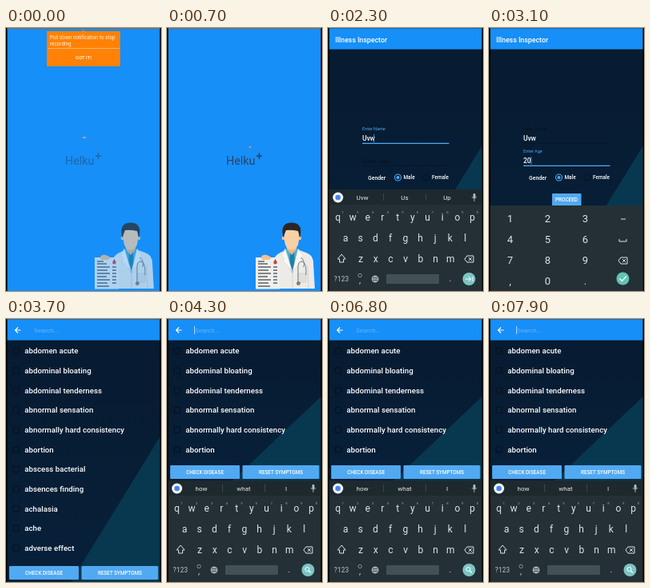
These frames come from a looping animation (194x329 px, 8000 ms). An HTML page:

```html
<!DOCTYPE html>
<html lang="en">
<head>
<meta charset="utf-8">
<title>Symptom checker demo</title>
<style>
  html, body { margin: 0; width: 100%; height: 100%; overflow: hidden; background: #000; }
  svg { display: block; width: 100vw; height: 100vh; font-family: Roboto, "Noto Sans", sans-serif; }
</style>
</head>
<body>
<svg id="stage" viewBox="0 0 194 329" preserveAspectRatio="none">
  <defs>
    <linearGradient id="navy" x1="0" y1="0" x2="0" y2="1">
      <stop offset="0" stop-color="#071b31"/>
      <stop offset="1" stop-color="#072039"/>
    </linearGradient>
    <clipPath id="screen"><path d="M1.600 0H192.500V329H1.600Z"/></clipPath>
    <g id="doctor">
      <path d="M130 326L133 291Q135 284 142 281L150 277H163L174 281Q181 283 183 291L185 326Z" fill="#ecebe7"/>
      <path d="M148 277H164L157 307Z" fill="#46b0da"/>
      <path d="M154 281H159L160 300L157 306L153 300Z" fill="#1f7fa6"/>
      <path d="M150 268H162V277L156 284L150 277Z" fill="#e8b588"/>
      <path d="M148 276L157 305L145 291L147 288L143 285Z M164 276L157 305L169 291L166 288L170 285Z" fill="#f8f8f6" stroke="#cfd0ce" stroke-width=".5"/>
      <path d="M157 305V326M176 296L177 326" stroke="#c8c9c7" stroke-width=".7"/>
      <circle cx="146" cy="263" r="2.300" fill="#f1c295"/>
      <circle cx="166" cy="263" r="2.300" fill="#f1c295"/>
      <path d="M147 252H165V266Q164 277 156 278Q148 277 147 266Z" fill="#f9d0a4"/>
      <path d="M145.500 262Q142 248 150 244.500Q163 241 167 250Q168 256 166.500 262L164 254Q156 252 149 253Z" fill="#2b2624"/>
      <path d="M164 307H174V318H164Z" fill="#e0e0dd" stroke="#bdbfbf" stroke-width=".5"/>
      <path d="M168 287Q173 292 171 299M164 309V300Q164 292 168 292Q174 292 174 304V309M164 309V319" fill="none" stroke="#777d82" stroke-width="1"/>
      <circle cx="164.500" cy="319.500" r="2" fill="#b9666a" stroke="#777d82"/>
      <path d="M111 287H141V326.500H111Z" fill="#efefed"/>
      <path d="M118 287Q119 283 125 284L131 287L128 290H119Z" fill="#f2c093"/>
      <path d="M135.500 289Q140 295 135.500 295.500Q131 295 135.500 289Z" fill="#c8473f"/>
      <path d="M114 292H122M114 295H126M114 299H130M114 303H127M114 307H130M114 311H126M114 315H130M114 319H127M114 323H129M133 299H138M133 303H138M133 307H138M133 311H138M133 315H138M133 319H138" stroke="#5d6366" stroke-width="1.300"/>
    </g>
  </defs>
  <g id="view" clip-path="url(#screen)"></g>
</svg>
<script>
const LOOP = 8000, STEP = 100;
const BLUE = '#168ff9', SKY = '#51a9f2', HINT = '#061221', KEY = '#dfe3e4', GREY = '#9ca5a9';
const view = document.getElementById('view');

const clamp = v => Math.max(0, Math.min(1, v));
const ramp = (t, from, to) => clamp((t - from) / (to - from));
const ease = p => 1 - (1 - p) ** 2;
const rect = (x, y, w, h, fill, more = '') =>
  `<rect x="${x}" y="${y}" width="${w}" height="${h}" fill="${fill}" ${more}/>`;
const dot = (x, y, r, fill, more = '') => `<circle cx="${x}" cy="${y}" r="${r}" fill="${fill}" ${more}/>`;
const line = (d, color, width = 1) => `<path d="${d}" fill="none" stroke="${color}" stroke-width="${width}"/>`;
const text = (x, y, str, size, fill = '#fff', more = '') =>
  `<text x="${x}" y="${y}" font-size="${size}" fill="${fill}" ${more}>${str}</text>`;
const MID = 'text-anchor="middle"', BOLD = 'font-weight="500"';
const label = (x, y, str, size, fill, more = '') => text(x, y, str, size, fill, MID + ' ' + more);
const at = (x, y, body) => `<g transform="translate(${x} ${y})">${body}</g>`;

// Latest value whose start time has passed
const pick = (t, steps) => steps.reduce((now, [start, value]) => t >= start ? value : now, steps[0][1]);

function backdrop(bottom) {
  const h = bottom - 27;
  return rect(0, 26, 194, h + 1, 'url(#navy)') +
    `<path d="M193 ${27 + h * 0.397}L81 ${bottom}H193Z" fill="#073850"/>`;
}

const header = () => rect(0, 0, 194, 26.6, BLUE) + rect(0, 0, 194, 0.6, '#385064');

function splash(t) {
  const fade = ramp(t, 0, 500), drift = ramp(t, 0, 700);
  let out = rect(0, 0, 194, 329, BLUE) + rect(0, 0, 194, 1.4, '#6b7075');
  out += `<g opacity="${0.52 + 0.48 * fade}">` +
    text(74, 171, 'Helku', 14.3, '#2a435f') + text(111.5, 164.5, '+', 14.3, '#2a435f', BOLD) + '</g>';
  out += `<ellipse cx="${98 + 6 * drift}" cy="${137 + 12 * drift}" rx="${2.6 - drift}" ry="1" fill="#c3c3d2" stroke="#6d7796" stroke-width=".6"/>`;
  out += `<use href="#doctor" opacity="${0.7 + 0.3 * fade}"/>`;
  if (t < 400) out += rect(51, 4, 92, 44, '#ff8206') + '<path d="M95 4L97 2L99 4Z" fill="#ff8206"/>' +
    text(55, 14, 'Pull down notification to stop', 6.3, '#fff3df') + text(55, 21.5, 'recording', 6.3, '#fff3df') +
    line('M52 25.500H142', '#ffc17f', 0.8) + label(97, 39, 'GOT IT!', 6, '#fff', BOLD);
  return out;
}

const backspace = (x, y) => at(x, y,
  line('M-6 0L-3 -4H5V4H-3ZM-1 -2L3 2M3 -2L-1 2', KEY));

function letterPad(caps, words, action) {
  const cased = s => caps ? s.toUpperCase() : s;
  let out = rect(0, 202, 194, 127, '#243035') + rect(0, 202, 194, 19, '#1e292e');
  out += dot(12.5, 212, 6.5, '#f6f7f7') + dot(12.5, 212, 3.3, '#4285f4');
  out += line('M69.500 207V216M122.500 207V216', '#4a555a', 0.7);
  words.forEach((w, i) => out += label(43 + 53 * i, 215, w, 8, '#e8ebec'));
  out += rect(181.7, 207, 2.8, 6, '#b9c1c4', 'rx="1.400"') + line('M180 211Q183 216 186 211M183 214V217', '#b9c1c4', 0.8);
  [['qwertyuiop', 12.3, 240.5], ['asdfghjkl', 22, 266.5], ['zxcvbnm', 41, 293]].forEach(([row, x0, y], r) => {
    [...row].forEach((c, i) => {
      const x = x0 + 18.7 * i;
      out += label(x, y, cased(c), 12, KEY);
      if (!r) out += label(x + 6.3, 231.5, (i + 1) % 10, 4.4, GREY);
    });
  });
  out += `<path d="M17 283L22 289H19.500V293H14.500V289H12Z" fill="${caps ? GREY : 'none'}" stroke="${caps ? GREY : KEY}"/>`;
  out += backspace(177, 289) + label(16.8, 317, '?123', 8.4, GREY, BOLD);
  out += dot(40, 309.5, 2.2, 'none', `stroke="${GREY}" stroke-width=".8"`) + label(40, 319, ',', 10, KEY);
  out += dot(59, 314, 4, 'none', `stroke="${KEY}" stroke-width=".8"`) +
    line('M55 314H63M59 310V318M59 310Q54.500 314 59 318Q63.500 314 59 310', KEY, 0.7);
  out += rect(73, 308, 66, 12, '#435055', 'rx="1"') + label(153, 317, '.', 11, KEY);
  out += dot(176.5, 314, 8, '#7bc4c4');
  out += action === 'search'
    ? dot(175.5, 313, 2.6, 'none', 'stroke="#fff"') + line('M177.500 315L180 317.500', '#fff', 1.2)
    : line('M172 314H179M176 311L179 314L176 317M181 311V317', '#fff');
  return out;
}

function numberPad() {
  let out = rect(0, 222, 194, 107, '#243035');
  ['123', '456', '789', ',0.'].forEach((row, r) => [...row].forEach((c, i) =>
    out += label(26.5 + 47 * i, 243 + 26 * r, c, 13, KEY)));
  out += line('M165 239H171M163 264V267H172V264', KEY) + backspace(168, 291);
  return out + dot(167.5, 313.5, 8, '#62c3b4') + line('M163.500 313.500L166.500 316.500L172 310.500', '#fff', 1.3);
}

const radio = (x, on) => dot(x, 187, 4, 'none', `stroke="${on ? SKY : HINT}" stroke-width="1.100"`) +
  (on ? dot(x, 187, 2.1, SKY) : '');

function field(name, y, value, focused, caret) {
  const floated = focused || value;
  let out = floated
    ? text(43, y - 10, name, 5.5, focused ? SKY : HINT)
    : text(43, y + 3, name, 8, HINT);
  out += text(43, y + 3, value, 8.4, '#fff', BOLD);
  out += line(`M43 ${y + 6.3}H151.500`, focused ? SKY : HINT, focused ? 1.2 : 0.6);
  if (focused && caret) out += rect(43.5 + value.length * 4.5, y - 5, 0.8, 10, SKY);
  return out;
}

function form(t) {
  const focus = pick(t, [[0, ''], [1200, 'name'], [2400, 'age']]);
  const name = pick(t, [[0, ''], [1700, 'U'], [1900, 'Uv'], [2100, 'Uvw']]);
  const age = pick(t, [[0, ''], [2700, '2'], [2900, '20']]);
  const caret = Math.floor(t / 500) % 2 === 0;
  let out = backdrop(329) + header() + text(9, 18, 'Illness Inspector', 8.8, '#fff', BOLD);
  out += field('Enter Name', 138, name, focus === 'name', caret);
  out += field('Enter Age', 166, age, focus === 'age', caret);
  out += text(50, 189.5, 'Gender', 6.9, '#fff', BOLD) + radio(87.5, true) + text(94.5, 189.4, 'Male', 6.4, '#fff', BOLD) +
    radio(123, false) + text(130, 189.4, 'Female', 6.4, '#fff', BOLD);
  out += rect(79, 207, 36.5, 16, SKY, 'rx="1"') + label(97, 217.4, 'PROCEED', 6.4, '#fff', BOLD);
  const shown = ease(ramp(t, 1100, 1400)) - ramp(t, 3200, 3400);
  if (shown > 0) out += at(0, 127 * (1 - shown), focus === 'age'
    ? numberPad()
    : letterPad(!name, name ? [name, 'Us', 'Up'] : ['How', 'What', 'I'], 'next'));
  return out;
}

const ALL = ['abdomen acute', 'abdominal bloating', 'abdominal tenderness', 'abnormal sensation',
  'abnormally hard consistency', 'abortion', 'abscess bacterial', 'absences finding',
  'achalasia', 'ache', 'adverse effect'];
const FOUND = ['pain', 'pain abdominal', 'pain back', 'pain chest', 'pain foot', 'pain in lower limb'];

function search(t) {
  const query = pick(t, [[0, ''], [4700, 'p'], [4900, 'pa'], [5200, 'pai'], [5400, 'pain'], [6800, '']]);
  const shown = ease(ramp(t, 3800, 4100));
  const bottom = shown > 0 ? 203 : 329;
  let out = backdrop(bottom) + header();
  out += line('M18.500 14H11.500M15 10.500L11.500 14L15 17.500', '#fff', 1.2);
  out += query
    ? text(34, 17, query, 8.6, '#fff', 'text-decoration="underline"') + line('M155.500 11.500L160.500 16.500M160.500 11.500L155.500 16.500', '#fff', 1.2)
    : text(35, 17, 'Search...', 8, '#63b4fa');
  if (Math.floor((t - 400) / 500) % 2) out += rect(query ? 34 + query.length * 4.1 : 34, 9, 0.8, 10, '#d8ecff');
  (query ? FOUND : ALL).forEach((item, i) => {
    const y = 40 + 24.65 * i;
    if (y > bottom - 30) return;
    out += rect(9, y - 3.7, 7.4, 7.4, 'none', `rx="1" stroke="${HINT}" stroke-width="1.200"`) +
      text(23.3, y + 3.3, item, 9.7, '#fff', BOLD);
  });
  const y = bottom - 20;
  out += rect(4, y, 87, 17, SKY, 'rx="1"') + label(47.5, y + 10.9, 'CHECK DISEASE', 6.35, '#fff', BOLD);
  out += rect(94.5, y, 96, 17, SKY, 'rx="1"') + label(142.5, y + 10.9, 'RESET SYMPTOMS', 6.35, '#fff', BOLD);
  const words = query.length > 2 ? ['pain', 'paint', 'painting'] : query ? [query, 'people', 'please'] : ['how', 'what', 'I'];
  if (shown > 0) out += at(0, 127 * (1 - shown), letterPad(false, words, 'search'));
  return out;
}

let last = -1;
function tick(now) {
  const t = Math.floor((now % LOOP) / STEP) * STEP;
  if (t !== last) {
    last = t;
    view.innerHTML = pick(t, [[0, splash], [1000, form], [3500, search]])(t);
  }
  requestAnimationFrame(tick);
}
tick(0);
</script>
</body>
</html>
```
